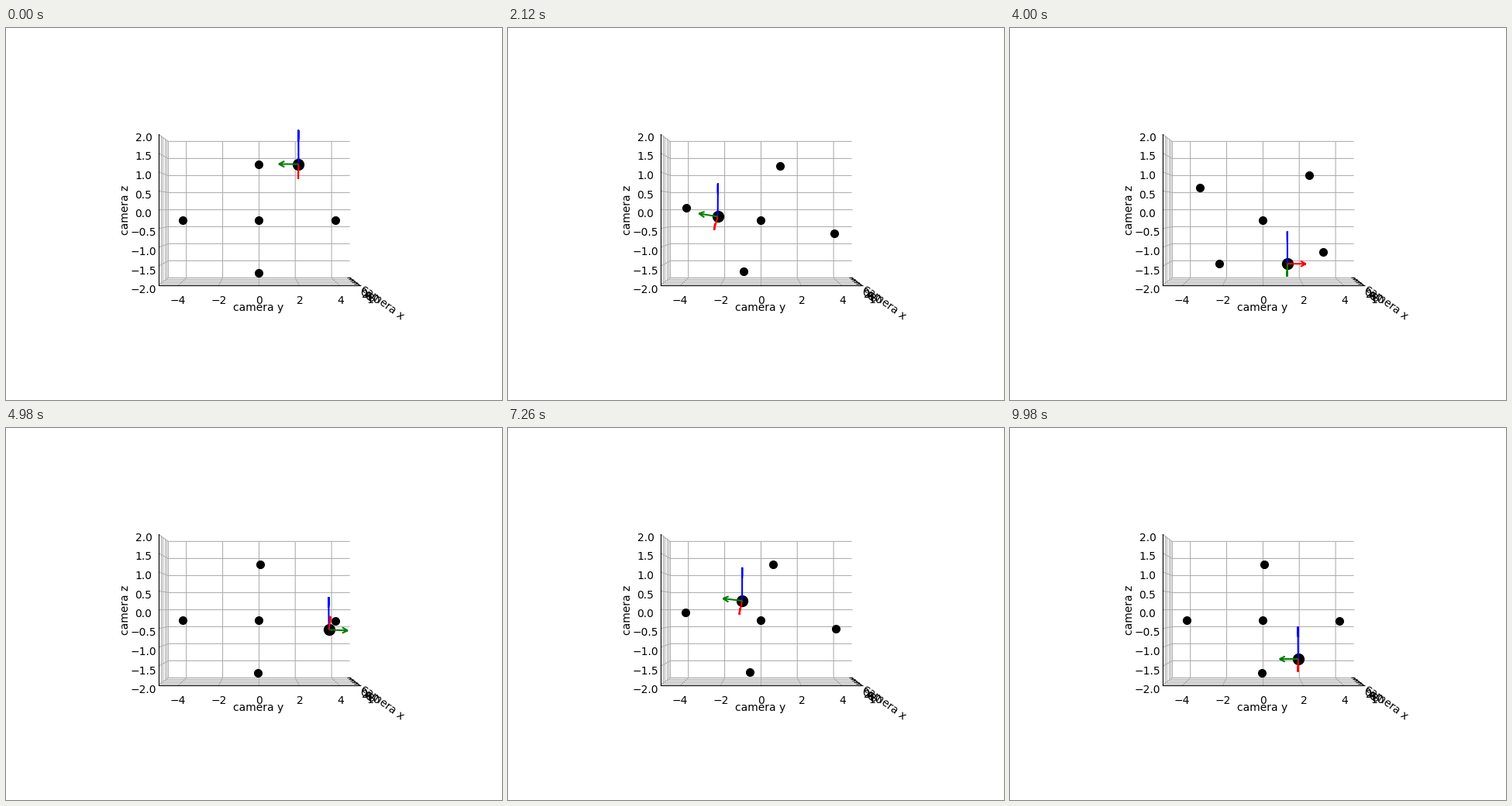
Animation of 640 by 480 pixels, one loop 10 s. Source, as a matplotlib script:

```python
import numpy as np
import matplotlib.pyplot as plt
from matplotlib.animation import FuncAnimation

W, H, DPI = 640, 480, 100
FRAMES, INTERVAL = 500, 20
CX, CZ = 326.4, 234.4            # vanishing point in pixels
SCALE_Y, SCALE_Z = 246.0, 462.0  # pixel scales before the depth division
TILT = np.radians(22.5)
CENTRE = np.array([5.0, 0.0, -0.305])

fig = plt.figure(figsize=(W / DPI, H / DPI), dpi=DPI, facecolor="white")
ax = fig.add_axes([0, 0, 1, 1])
ax.set_xlim(0, W)
ax.set_ylim(H, 0)
ax.axis("off")


def project(points):
    """Camera-frame points (n, 3) to pixel positions, seen from +x."""
    x, y, z = np.asarray(points, float).T
    depth = 10.5 - x / 10
    return CX + SCALE_Y * y / depth, CZ - SCALE_Z * z / depth


def path(points, color, width=0.8, cap="butt", zorder=1):
    ax.plot(*project(points), color=color, lw=width, zorder=zorder,
            solid_capstyle=cap, solid_joinstyle="round")


def label(x, y, text, rotation=0):
    ax.text(x, y, text, ha="center", va="center", rotation=rotation,
            rotation_mode="default", fontsize=10, family="DejaVu Sans",
            zorder=2)


def signed(text):
    return text.replace("-", "\u2212")


def draw_box():
    grey = "#b0b0b0"
    for x in range(0, 11, 2):
        path([(x, -5, 2), (x, -5, -2), (x, 5, -2)], grey)
        path([(x, 4.833, -2), (x, 5.083, -2)], "black", zorder=2)
        label(461 + 1.3 * x, 342 + 0.9 * x, str(x))
    for y in range(-4, 5, 2):
        path([(10, y, -2), (0, y, -2), (0, y, 2)], grey)
        label(326.7 + 26.15 * y, 351.5, signed(str(y)))
    for z in np.arange(-2, 2.1, 0.5):
        path([(10, -5, z), (0, -5, z), (0, 5, z)], grey)
        label(177.5, 240 - 49 * z, signed(f"{z:.1f}"))

    for far_end in [(0, 5, -2), (10, -5, -2)]:
        path([(10, 5, -2), far_end], "black", cap="projecting", zorder=2)
    path([(10, -5, -2), (10, -5, 2)], "black", cap="projecting", zorder=2)

    label(486, 354, "camera x", -36.6)
    label(325.5, 361.5, "camera y")
    label(154, 234.5, "camera z", 90)


def to_camera(vectors, angle):
    """Turn ground-frame vectors by the orbit angle, then tilt them."""
    x, y, z = np.asarray(vectors, float).T
    u = x * np.cos(angle) + y * np.sin(angle)
    v = y * np.cos(angle) - x * np.sin(angle)
    return np.stack([u * np.cos(TILT) - z * np.sin(TILT), v,
                     u * np.sin(TILT) + z * np.cos(TILT)], axis=1)


def arrow_points(start, vec, ratio=0.3, spread=np.radians(15)):
    """Shaft and two barbs, the barbs lying in the vertical plane of vec."""
    tip = start + vec
    gap = np.full(3, np.nan)
    points = [start, tip]
    axis = np.array([vec[1], -vec[0], 0]) / np.hypot(vec[0], vec[1])
    side = np.cross(axis, vec)
    for sign in (1, -1):
        barb = vec * np.cos(spread) + sign * side * np.sin(spread)
        points += [gap, tip, tip - ratio * barb]
    return np.array(points)


# Unicycle with constant speed and a cosine turn rate
dt = INTERVAL / 1000
clock = np.arange(FRAMES) * dt
turn = np.cos(2 * np.pi * clock / 10)
heading = np.pi + dt * (np.cumsum(turn) - turn)
step = 1.5 * dt * np.stack([np.cos(heading), np.sin(heading)], axis=1)
track = np.array([4, 2]) + np.cumsum(step, axis=0) - step

LANDMARKS = [(0, 0, 0), (4, 0, 0), (-4, 0, 0), (0, 4, 0), (0, -4, 0)]

draw_box()
dots, = ax.plot([], [], "o", color="black", ms=7, zorder=3)
body, = ax.plot([], [], "o", color="black", ms=10, zorder=3)
arrows = [ax.plot([], [], color=c, lw=1.5, solid_capstyle="butt")[0]
          for c in ("r", "g", "b")]


def update(i):
    angle = 2 * np.pi * i / FRAMES
    dots.set_data(*project(CENTRE + to_camera(LANDMARKS, angle)))

    x, y = track[i]
    origin = CENTRE + to_camera([(x, y, 0)], angle)[0]
    body.set_data(*project([origin]))

    c, s = np.cos(heading[i]), np.sin(heading[i])
    frame = to_camera([(c, s, 0), (-s, c, 0), (0, 0, 1)], angle)
    for line, vec in zip(arrows, frame):
        line.set_data(*project(arrow_points(origin, vec)))
        line.set_zorder(6 + vec[0])  # nearer arrows on top
    return [dots, body, *arrows]


anim = FuncAnimation(fig, update, frames=FRAMES, interval=INTERVAL,
                     repeat=True, repeat_delay=0, blit=False)
plt.show()
```
